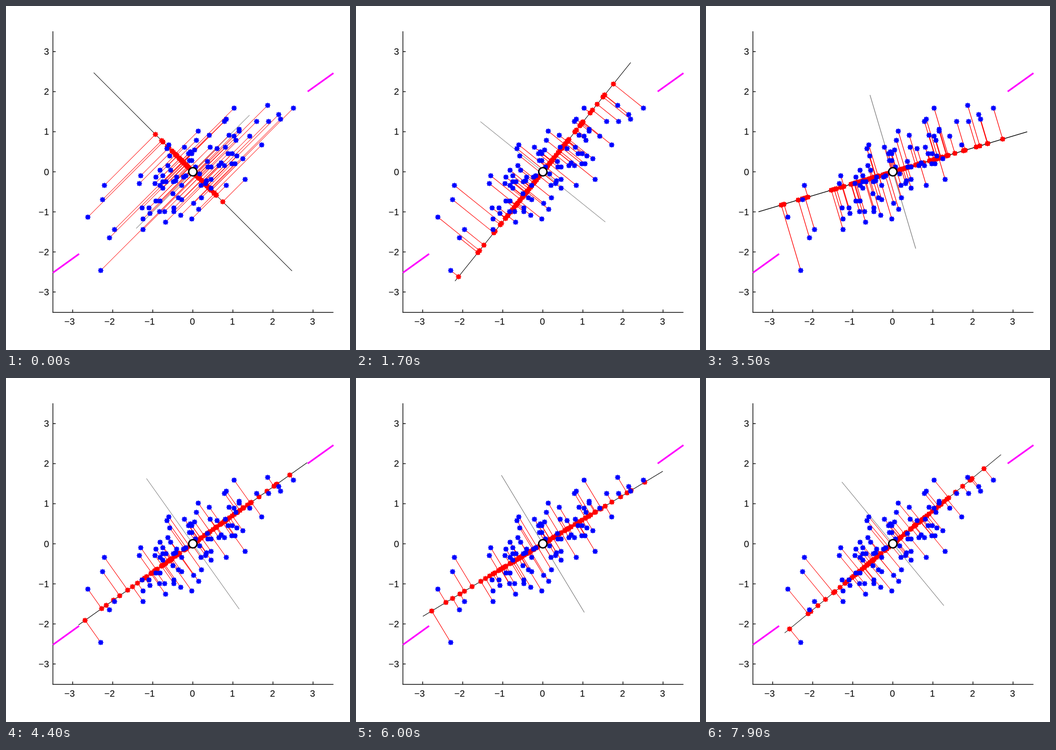
These frames come from a looping animation (748x748 px, 8 s). An HTML page with a canvas:

```html
<!DOCTYPE html>
<html>
<head>
<meta charset="utf-8">
<style>
html, body { margin: 0; width: 100%; height: 100%; overflow: hidden; background: #fff; }
canvas { display: block; }
</style>
</head>
<body>
<canvas id="plot" width="748" height="748"></canvas>
<script>
const ctx = document.getElementById('plot').getContext('2d');
const CX = 406.3, CY = 360.5, UNIT = 87.1;
const STEPS = 80, STEP_MS = 100;

// Scatter points, grouped by row: y -> list of x
const rows = {
  216: [569], 222: [496, 625], 236: [593], 246: [479, 597], 251: [475, 545, 571],
  268: [507], 272: [418, 507], 281: [442, 485], 283: [496, 530], 292: [414, 500],
  302: [354, 556], 307: [388, 444, 477], 310: [350, 459], 313: [410], 317: [401],
  321: [397, 404, 483, 492], 326: [356, 502], 332: [515], 336: [399, 404], 338: [438],
  341: [468], 343: [491, 498], 347: [352, 463, 475], 350: [412, 439, 446], 357: [335, 358],
  365: [421], 369: [293, 341, 391], 372: [326, 371, 386], 377: [446, 520], 380: [369, 436],
  382: [341, 348, 364], 386: [290, 324, 434], 390: [214, 335, 382, 424, 479], 396: [341, 446],
  408: [363], 417: [375, 425], 421: [210, 382], 424: [326, 335], 429: [408],
  439: [296, 311, 365], 442: [419], 447: [334, 345, 365], 451: [313], 455: [380], 459: [178],
  463: [298, 404], 470: [347], 486: [236, 298], 504: [225], 575: [206]
};
const points = Object.entries(rows).flatMap(([y, xs]) => xs.map(x => [x, +y]));

// The axis swings like a damped pendulum around the main direction of the data
const REST = 35.4, PULL = 1.515, DRAG = 0.93;
const angles = [-45];
for (let i = 1, speed = 0; i < STEPS; i++) {
  const last = angles[i - 1];
  speed = DRAG * speed + PULL * Math.sin((REST - last) * Math.PI / 90);
  angles.push(last + speed);
}

function line(x1, y1, x2, y2, color, width) {
  ctx.strokeStyle = color;
  ctx.lineWidth = width;
  ctx.beginPath();
  ctx.moveTo(x1, y1);
  ctx.lineTo(x2, y2);
  ctx.stroke();
}

function marker(x, y, color) {
  ctx.fillStyle = color;
  ctx.fillRect(x - 4.6, y - 4.5, 9.2, 9.2);
  ctx.fillRect(x - 6, y - 0.7, 12, 1.5);
  ctx.fillRect(x - 0.7, y - 5.8, 1.5, 11.6);
}

function drawAxes() {
  line(102, 55, 102, 667, '#000', 1.5);
  line(101.3, 666.3, 712, 666.3, '#000', 1.5);
  ctx.fillStyle = '#000';
  ctx.font = '20px "Liberation Sans", Arial, sans-serif';
  ctx.textAlign = 'right';
  for (let k = -3; k <= 3; k++) {
    const x = CX + k * UNIT, y = CY - k * UNIT;
    const label = String(k).replace('-', '\u2212');
    line(x, 666, x, 660, '#000', 1.5);
    line(102, y, 108, y, '#000', 1.5);
    ctx.fillText(label, x + 4.5, 692.5);
    ctx.fillText(label, 93.5, y + 7);
  }
  line(656, 186, 712, 146, '#f0f', 3.4);
  line(102, 580, 159, 539, '#f0f', 3.4);
}

function draw(now) {
  const angle = angles[Math.floor(now / STEP_MS) % STEPS] * Math.PI / 180;
  const ux = Math.cos(angle), uy = -Math.sin(angle);
  const thin = 1.45 * Math.max(Math.abs(ux), Math.abs(uy));
  const long = 3.5 * UNIT, short = 2 * UNIT;

  ctx.fillStyle = '#fff';
  ctx.fillRect(0, 0, 748, 748);
  drawAxes();
  line(CX - uy * short, CY + ux * short, CX + uy * short, CY - ux * short, '#808080', thin);
  line(CX - ux * long, CY - uy * long, CX + ux * long, CY + uy * long, '#000', thin);

  const feet = points.map(([x, y]) => {
    const d = (x - CX) * ux + (y - CY) * uy;
    return [CX + d * ux, CY + d * uy];
  });
  points.forEach(([x, y], i) => line(x, y, ...feet[i], '#f00', thin));
  feet.forEach(([x, y]) => marker(x, y, '#f00'));
  points.forEach(([x, y]) => marker(x, y, '#00f'));

  ctx.beginPath();
  ctx.arc(CX, CY, 9, 0, 2 * Math.PI);
  ctx.fillStyle = '#fff';
  ctx.fill();
  ctx.strokeStyle = '#000';
  ctx.lineWidth = 3.2;
  ctx.stroke();
}

const start = performance.now();
function tick() {
  draw(performance.now() - start);
  requestAnimationFrame(tick);
}
tick();
</script>
</body>
</html>
```
